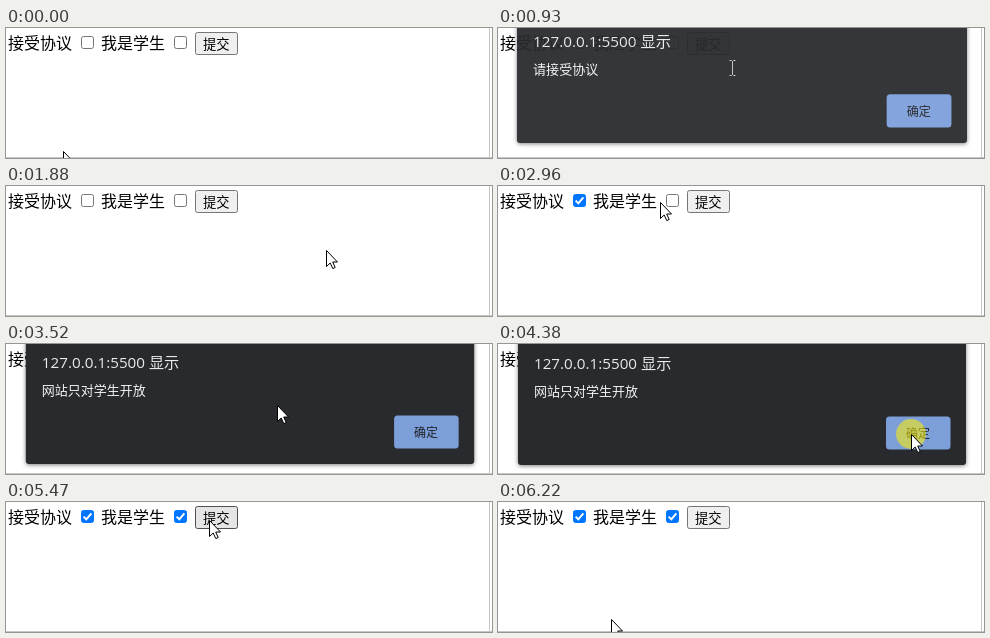
An HTML page for the animation above (6.3 s loop, 486 px wide and 130 px high).

```html
<!DOCTYPE html>
<html lang="zh-CN">
<head>
<meta charset="utf-8">
<title>提交</title>
<style>
  html, body { margin: 0; width: 100%; height: 100%; overflow: hidden; background: #fff; }
  svg { display: block; width: 486px; height: 130px; }
  text { font-family: "Noto Sans CJK SC", "Noto Sans CJK", sans-serif; font-size: 16px; fill: #000; }
  .box rect { fill: #fff; stroke: #767676; }
  .box path { fill: none; stroke: #fff; stroke-width: 2; visibility: hidden; }
  .box.hover rect { stroke: #4f4f4f; }
  .box.on rect { fill: #0075ff; stroke: #0075ff; }
  .box.on.hover rect { fill: #005cc8; stroke: #005cc8; }
  .box.on path { visibility: visible; }
  #submit rect { fill: #efefef; stroke: #767676; }
  #submit.hover rect { fill: #e5e5e5; stroke: #4f4f4f; }
  #submit text { font-size: 13.333px; }
  #panel { fill: #292a2d; filter: drop-shadow(0 1px 2px rgba(0, 0, 0, .5)); }
  #dialog .title { font-family: "Open Sans", "Noto Sans CJK SC", sans-serif; font-size: 15.2px; fill: #e8eaed; }
  #message { font-size: 13px; font-weight: 500; fill: #f1f3f4; }
  #ok rect { fill: #7c9fda; }
  #ok text { font-size: 12px; fill: #202124; }
  #press { fill: rgba(255, 240, 0, .55); }
  #arrow { fill: #fff; stroke: #000; }
  #beam { fill: none; stroke: #000; }
  #beam.light { stroke: #c4c4c4; }
</style>
</head>
<body>
<svg viewBox="0 0 486 130">
  <path d="M0 129.5H486M483.5 0V130" stroke="#c6c6c6" fill="none"/>
  <text x="2" y="21">接受协议</text>
  <g class="box" id="agree" transform="translate(75 8)">
    <rect x=".5" y=".5" width="12" height="12" rx="2"/>
    <path d="M2.6 6.6L5.3 9.3L10.4 3.3"/>
  </g>
  <text x="95" y="21">我是学生</text>
  <g class="box" id="student" transform="translate(168 8)">
    <rect x=".5" y=".5" width="12" height="12" rx="2"/>
    <path d="M2.6 6.6L5.3 9.3L10.4 3.3"/>
  </g>
  <g id="submit">
    <rect x="189.5" y="4.5" width="42" height="22" rx="2"/>
    <text x="197" y="21">提交</text>
  </g>
  <g id="dialog">
    <rect id="panel" x="20" y="-80" width="448" height="201" rx="3"/>
    <text class="title" x="36" y="25">127.0.0.1:5500 显示</text>
    <text id="message" x="36" y="52"></text>
    <g id="ok">
      <rect x="388" y="72.5" width="64.5" height="33" rx="3.5"/>
      <text x="408" y="94">确定</text>
    </g>
  </g>
  <g id="cursor">
    <circle id="press" r="15"/>
    <path id="arrow" d="M.5 .5V16.5L4.2 13L6.8 18.6L9.2 17.5L6.7 12H11.5Z"/>
    <path id="beam" d="M-2.5 -7.5H-.5L.5 -6.5L1.5 -7.5H3.5M.5 -6.5V6.5M-2.5 7.5H-.5L.5 6.5L1.5 7.5H3.5"/>
  </g>
</svg>
<script>
const LOOP = 6300, STEP = 75, PRESS = 75;
const $ = id => document.getElementById(id);

// Each scene restarts the steady refresh rhythm
const scenes = [0, 780, 1650, 2570, 3280, 4380, 4990, 5690];
const clicks = [700, 1650, 2570, 3190, 4380, 4990, 5610];

const home = { x: 57, y: 123 };
const moves = [
  { from: 0, to: 620, x: 228, y: 19 },      // submit
  { from: 780, to: 930, x: 234, y: 40 },
  { from: 930, to: 1480, x: 420, y: 86 },   // confirm
  { from: 1650, to: 2420, x: 77, y: 10 },   // first checkbox
  { from: 2570, to: 3170, x: 213, y: 19 },  // submit
  { from: 3190, to: 3505, x: 271, y: 61 },
  { from: 3505, to: 4230, x: 413, y: 90 },  // confirm
  { from: 4380, to: 4605, x: 180, y: 31 },
  { from: 4605, to: 4840, x: 172, y: 16 },  // second checkbox
  { from: 4990, to: 5590, x: 213, y: 19 },  // submit
  { from: 5690, to: 6215, x: 113, y: 117 }
];
const alerts = [
  { open: 780, close: 1710, text: "请接受协议" },
  { open: 3280, close: 4440, text: "网站只对学生开放" }
];

const clamp = v => Math.max(0, Math.min(1, v));
const inside = (x, y, l, t, r, b) => x >= l && x <= r && y >= t && y <= b;

function sample(t) {
  const start = scenes.filter(s => s <= t).pop();
  return start + Math.floor((t - start) / STEP) * STEP;
}

function pointer(t) {
  let { x, y } = home;
  for (const m of moves) {
    const k = clamp((t - m.from) / (m.to - m.from));
    x += (m.x - x) * k;
    y += (m.y - y) * k;
  }
  return [Math.round(x), Math.round(y)];
}

function drawAlert(t) {
  const a = alerts.find(a => t >= a.open && t < a.close + 140);
  $("dialog").style.display = a ? "" : "none";
  if (!a) return false;
  const age = t - a.open + 40;
  const drop = -42 * (1 - clamp(age / 313)) ** 2;
  const shown = 1 - (1 - clamp(age / 250)) ** 2;
  $("message").textContent = a.text;
  $("dialog").setAttribute("transform",
    `translate(244 ${drop}) scale(${1 - drop * 0.0007}) translate(-244 0)`);
  $("dialog").setAttribute("opacity", shown * (1 - clamp((t - a.close) / 140)));
  return t < a.close;
}

function draw(now) {
  const t = sample(now);
  const [x, y] = pointer(t);
  const modal = drawAlert(t);
  const over = (...area) => !modal && inside(x, y, ...area);

  $("agree").classList.toggle("on", now >= clicks[2] + PRESS);
  $("student").classList.toggle("on", now >= clicks[5] + PRESS);
  $("agree").classList.toggle("hover", over(75, 8, 88, 21));
  $("student").classList.toggle("hover", over(168, 8, 181, 21));
  $("submit").classList.toggle("hover", over(189, 4, 232, 27));

  const typing = over(2, 6, 66, 26) || over(95, 6, 159, 26) ||
    (modal && inside(x, y, 36, 32, 452, 50));
  $("beam").style.display = typing ? "" : "none";
  $("beam").classList.toggle("light", modal);
  $("arrow").style.display = typing ? "none" : "";
  $("press").style.display = clicks.some(c => now >= c && now < c + PRESS) ? "" : "none";
  $("cursor").setAttribute("transform", `translate(${x} ${y})`);
}

const start = performance.now();
function loop() {
  draw(Math.max(0, performance.now() - start) % LOOP);
  requestAnimationFrame(loop);
}
draw(0);
requestAnimationFrame(loop);
</script>
</body>
</html>
```
